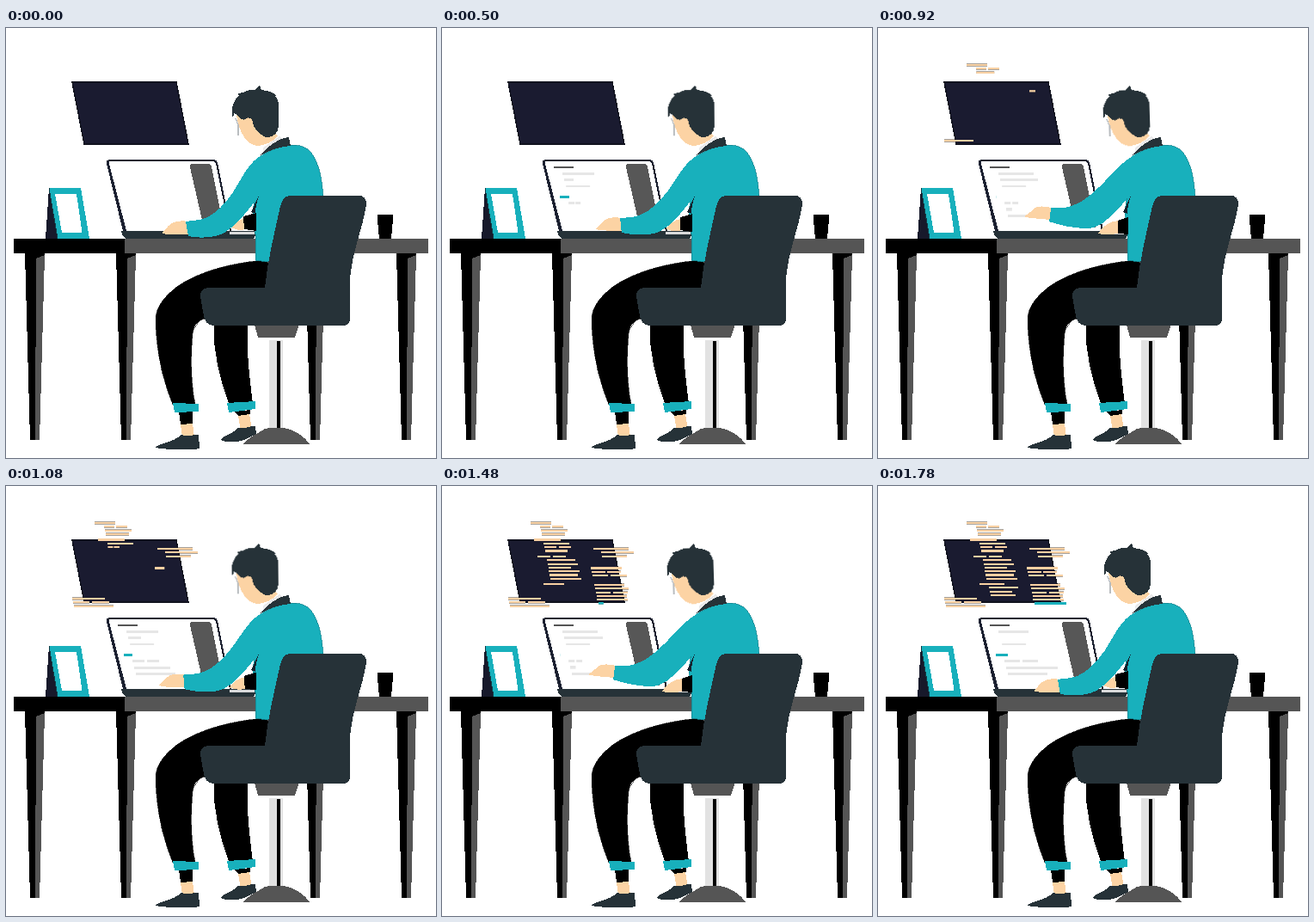
Recreate the animation shown at these times as an HTML page. Size 500 px wide and 500 px high, loop 1.8 s.

```html
<!DOCTYPE html>
<html lang="en">
<head>
<meta charset="utf-8">
<title>Working at a desk</title>
<style>
  html, body { margin: 0; width: 100%; height: 100%; overflow: hidden; background: #fff; }
  svg { display: block; width: 100vw; height: 100vh; shape-rendering: crispEdges; }
  .teal { fill: #18b0bc; }
  .slate { fill: #263238; }
  .skin { fill: #fcd3a4; }
  .gray { fill: #555; }
  .shirt { fill: #18b0bc; stroke: #128590; stroke-width: .8; }
  .swing { animation: 600ms cubic-bezier(.37, 0, .63, 1) infinite; }
  #head { transform-origin: 302px 135px; animation-name: nod; }
  #arm { animation-name: reach; }
  #hand { animation-name: tap; }
  #farHand { animation-name: farTap; }
  #farCuff { animation-name: farReach; }
  @keyframes nod { 50% { transform: rotate(-1.8deg); } }
  @keyframes reach {
    0%, 100% { d: path("M298 148C283 154 273 177 264 191C255 204 243 217 232 221C224 224 216 224 209 225L212 242C226 245 243 244 254 238C268 230 282 212 294 195L310 170Z"); }
    50% { d: path("M298 148C286 153 274 168 261 181C251 191 239 202 227 206C218 210 208 209 201 209L199 225C214 230 238 235 251 232C266 227 280 210 294 193L310 170Z"); }
  }
  @keyframes tap {
    0%, 100% { d: path("M211 225C200 223 192 226 188 231C185 235 181 238 182 239C190 241 203 240 213 240Z"); }
    50% { d: path("M203 209C190 206 184 207 180 211C176 215 171 218 170 219C178 222 190 221 200 223Z"); }
  }
  @keyframes farTap {
    0%, 100% { d: path("M278 221C270 223 264 228 262 232C268 235 273 236 278 234Z"); }
    50% { d: path("M280 224C270 224 260 231 256 239C264 241 272 240 280 239Z"); }
  }
  @keyframes farReach {
    0%, 100% { d: path("M276 219L291 215V236L277 234Z"); }
    50% { d: path("M279 224L291 220V240L279 239Z"); }
  }
</style>
</head>
<body>
<svg viewBox="0 0 500 500">
  <!-- floating code panel -->
  <g id="fringe"></g>
  <path d="M77 63H198L212 135H91Z" fill="#1a1b30" stroke="#11131f" stroke-width="1.5" stroke-linejoin="round"/>
  <g id="code"></g>

  <!-- desk -->
  <g id="legs"></g>
  <path d="M9 245H491V262H9Z" class="gray"/>
  <path d="M9 245H138V262H9Z"/>
  <path d="M432 217H450V223L448 245H434L432 223Z"/>

  <!-- picture frame -->
  <path d="M50 186L46 245H62Z" fill="#17192b"/>
  <path d="M50 186H87L97 245H60Z" class="teal"/>
  <path d="M50 186L60 245" stroke="#123b45"/>
  <path d="M57 193H82L88.500 238H65Z" fill="#fff"/>

  <!-- laptop -->
  <path d="M121 153H241Q245 153 246 157L263 240H137L117 158Q116 153 121 153Z" fill="#1c2131"/>
  <path d="M123 154.500H239Q243 154.500 244 158L260 236H140L120 158Q119 154.500 123 154.500Z" fill="#fff"/>
  <path d="M217 158H235Q238 158 239 161L253 232H230L214 162Q213 158 217 158Z" fill="#575757"/>
  <g id="page"></g>
  <path d="M134 236H289L291 240L288 245H140Q135 243 134 236Z" class="slate"/>
  <path d="M260 237H289V240H260Z" fill="#d9dadb"/>

  <!-- legs and feet -->
  <path d="M304 270C265 272 225 283 200 300C180 315 174 328 174 340C175 380 183 410 194 438H220C214 410 215 375 217 355Q219 341 233 337L310 310Z" stroke="#000" stroke-width=".6"/>
  <path d="M242 344H281C279 380 284 410 287 437H259C248 405 240 375 242 344Z"/>
  <path d="M201 446H217V460L203 461Z"/>
  <path d="M266 446L284 444V449L270 451Z"/>
  <path d="M203 461L217 460L219 476H205Z" class="skin"/>
  <path d="M270 451L283 449L286 466L273 468Z" class="skin"/>
  <path d="M194 436L224 437V446L196 447Z" class="teal"/>
  <path d="M257 436L290 434V443L259 447Z" class="teal"/>
  <path d="M174 488C176 483 195 482 204 473C212 476 220 472 224 473L225 489C215 491 190 491 174 488Z" class="slate"/>
  <path d="M250 479C252 474 262 473 270 465C276 467 285 462 290 463L291 473C286 474 280 478 274 480C264 482 254 482 250 479Z" class="slate"/>

  <!-- body -->
  <path id="farHand" class="skin swing"/>
  <path d="M296 149C310 140 322 137 334 136C356 136 366 154 369 198L340 260L304 272L290 270V240L287 213L290 194Z" class="shirt"/>
  <path id="farCuff" class="swing"/>
  <path d="M294 195L285 214L290 216Q290 206 294 195Z" fill="#15202b"/>
  <path id="hand" class="skin swing"/>
  <path id="arm" class="teal swing"/>

  <!-- head -->
  <path d="M299 139L318 126L324 132L299 146Z" fill="#e9e9ea"/>
  <g id="head" class="swing">
    <path d="M267 98L271 115C275 126 281 134 288 136C296 139 308 134 316 126L290 98Z" class="skin"/>
    <path d="M267 105L270 113V125" fill="none" stroke="#b9bdc0" stroke-width="1.500"/>
    <path d="M264 106C261 94 264 84 271 79L270 76L276 75Q283 71 289 72L295 67L297 72Q308 73 315 79L313 79Q318 84 317 97V114C316 123 310 128 302 127C294 123 289 118 286 109L274 106C270 103 268 100 265 99Z" class="slate"/>
    <path d="M275 116C274 103 285 101 287 109C288 115 286 119 288 123L279 127Z" class="skin"/>
  </g>
  <path d="M296 148C302 140 316 128 329 127L331 137C318 138 307 142 296 148Z" class="slate"/>

  <!-- chair -->
  <path d="M306 363H322V470H306Z" fill="#e2e2e2"/>
  <path d="M315 364H319V468H315Z"/>
  <path d="M289 345H341L336 360H293Z" class="gray"/>
  <path d="M276 484C284 474 294 471 301 466Q314 463 328 466C339 470 347 475 353 484Z" class="gray"/>
  <path d="M330 195H411Q419 195 419 206C415 232 402 262 400 290V338Q400 346 392 346H242C234 346 231 342 229 330L226 312Q226 302 237 302H301C304 270 313 235 319 207Q322 195 330 195Z" class="slate"/>
</svg>
<script>
  const LOOP = 1800;
  const SWING = 600;
  const NS = "http://www.w3.org/2000/svg";
  const PEACH = "#f8d0a2", TEAL = "#18b0bc", PALE = "#e6e6e6";
  const get = id => document.getElementById(id);

  let seed = 7;
  const rand = () => (seed = seed * 16807 % 2147483647) / 2147483647;

  function add(parent, tag, attrs) {
    const el = document.createElementNS(NS, tag);
    for (const k in attrs) el.setAttribute(k, attrs[k]);
    return parent.appendChild(el);
  }

  // a text line, optionally split into two words
  function bar(parent, { x, y, w, split }, h, fill) {
    const g = add(parent, "g", {});
    g.style.transformOrigin = `${x}px ${y}px`;
    const words = split ? [[0, .46], [.54, 1]] : [[0, 1]];
    for (const [a, b] of words)
      add(g, "rect", { x: x + a * w, y: y - h / 2, width: (b - a) * w, height: h, fill });
    return g;
  }

  const stretch = s => ({ transform: `scaleX(${s})` });

  function typeIn(el, start, dur) {
    el.animate([
      stretch(0),
      { ...stretch(0), offset: start / LOOP },
      { ...stretch(1), offset: (start + dur) / LOOP },
      stretch(1)
    ], { duration: LOOP, iterations: Infinity });
  }

  // a paragraph leaning with the screen, its first line outdented
  function paragraph(x, y, n, indent, w, pitch = 4.3, lean = .2) {
    return Array.from({ length: n }, (_, i) => ({
      x: x + i * pitch * lean + (i ? indent : 0),
      y: y + i * pitch,
      w: w * (.82 + .36 * rand()),
      split: rand() < .25
    }));
  }

  function typeCode(lines, start, step) {
    lines.forEach((line, i) => {
      const t = start + i * step;
      typeIn(bar(get("fringe"), line, 3.2, "#a8a39d"), t, step);
      typeIn(bar(get("code"), line, 2.2, line.fill || PEACH), t, step);
    });
  }

  typeCode([
    ...paragraph(103, 43, 4, 10, 29), ...paragraph(107, 62.5, 4, 10, 28),
    ...paragraph(111, 82, 7, 10, 31), ...paragraph(118, 114, 4, 10, 30)
  ], 808, 42.5);
  typeCode([
    ...paragraph(176, 73, 3, 8, 35), ...paragraph(173, 95.5, 3, 0, 35),
    ...paragraph(177, 115, 5, 0, 37), { x: 182, y: 136.5, w: 37, fill: TEAL }
  ], 912, 51);
  typeCode(paragraph(77, 131, 3, 0, 40), 880, 45);

  // laptop page: each line types in once, then breathes with the arm
  const page = [
    ...paragraph(130, 162, 4, 8.5, 40, 7.3, .24),
    ...paragraph(137, 196.5, 4, 8.5, 40, 7.3, .24)
  ];
  // width, share at rest, share at full reach
  const sizes = [
    [23, 1, 1], [41, .85, 1], [45, 0, 1], [36, .8, .8],
    [14.5, 1, 0], [39, 1, .4], [61, 1, .1], [46, 1, 1]
  ];
  page.forEach((line, i) => {
    const [w, rest, reach] = sizes[i];
    const outer = add(get("page"), "g", {});
    outer.style.transformOrigin = `${line.x}px ${line.y}px`;
    const fill = i === 0 ? "#555" : i === 4 ? TEAL : PALE;
    const inner = bar(outer, { ...line, w, split: i === 5 }, 2.8, fill);
    typeIn(outer, 50 + i * 80, 120);
    inner.animate([stretch(rest), stretch(reach)],
      { duration: SWING / 2, iterations: Infinity, direction: "alternate", easing: "cubic-bezier(.37, 0, .63, 1)" });
  });

  // four equal tapered desk legs
  for (const x of [22, 128, 348, 454]) {
    add(get("legs"), "path", { d: `M${x} 262h23l-6 217h-11Z` });
    add(get("legs"), "path", { d: `M${x + 13} 268l10 -4l-6 215h-5Z`, class: "gray" });
  }
</script>
</body>
</html>
```
